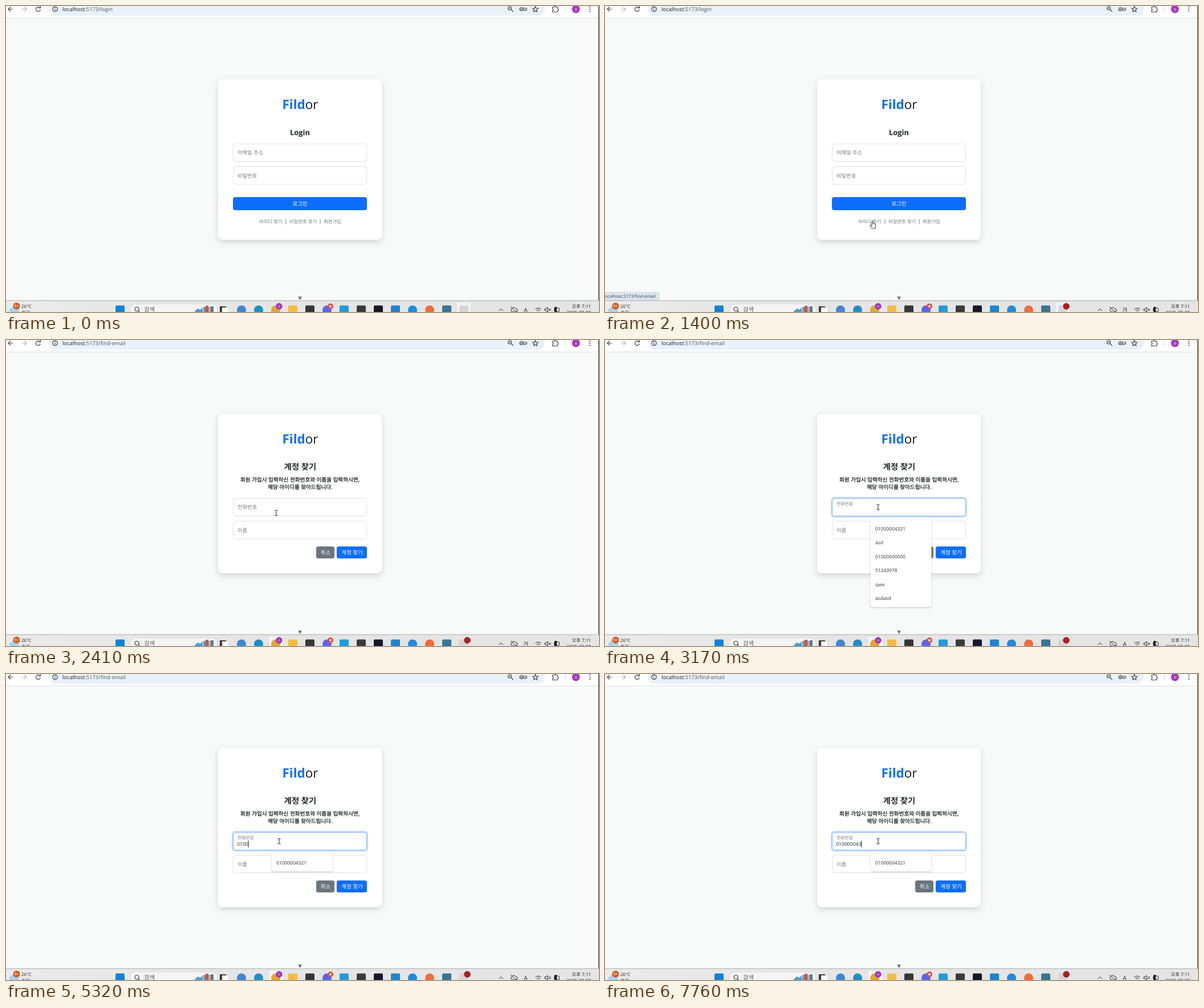
These frames come from a looping animation (1040 by 538 pixels, 8 s). An HTML page:

```html
<!DOCTYPE html>
<html lang="ko">
<head>
<meta charset="utf-8">
<title>Login</title>
<style>
html, body { margin: 0; width: 100%; height: 100%; overflow: hidden; background: #f8faf9; }
svg { display: block; width: 100%; height: 100%; font-family: 'Open Sans', 'Noto Sans CJK KR', sans-serif; text-rendering: geometricPrecision; }
text { white-space: pre; }
.mid { text-anchor: middle; }
.line { fill: none; stroke: #444; stroke-width: 1.2; }
.card { fill: #fff; filter: drop-shadow(0 4px 5.5px rgba(0,0,0,.15)); }
.field { fill: #fff; stroke: #dee2e6; }
.label { font-size: 9.3px; fill: #777; }
.btn { font-size: 9.5px; fill: #fff; text-anchor: middle; }
.link { font-size: 8.4px; fill: #6c757d; }
.brand { font-size: 22.5px; text-anchor: middle; fill: #16191c; }
.brand tspan { font-weight: 700; fill: #0d6efd; }
.head { font-weight: 700; text-anchor: middle; fill: #212529; }
.note { font-size: 9.6px; text-anchor: middle; fill: #212529; stroke: #212529; stroke-width: .3; }
.pop { fill: #fff; filter: drop-shadow(0 1px 1px rgba(0,0,0,.24)); }
.item { font-size: 8.45px; fill: #333; }
</style>
</head>
<body>
<svg viewBox="0 0 1040 538">
  <defs><linearGradient id="bar"><stop stop-color="#ebebeb"/><stop offset=".35" stop-color="#e5e5e5"/></linearGradient></defs>
  <rect width="1040" height="538" fill="#f8faf9"/>

  <!-- browser bar -->
  <rect width="1040" height="21" fill="#fff"/>
  <rect y="20.5" width="1040" height="1" fill="#dcdfe3"/>
  <rect x="75" y="-8" width="870" height="25" rx="12" fill="#e9f1fb"/>
  <path class="line" d="M12 5.5H4M8 1.5l-4 4 4 4"/>
  <path class="line" d="M28 5.5h8M32 1.5l4 4-4 4" style="stroke:#b5b5b5"/>
  <path class="line" d="M59.5 3a4 4 0 1 0 .8 3.5M60.5 0v3.5H57"/>
  <circle class="line" cx="86" cy="5.5" r="4.2"/>
  <path class="line" d="M86 5v3M86 2.8v1.2"/>
  <text x="99" y="9" font-size="9.4" fill="#1f1f1f">localhost<tspan fill="#555">:5173/<tspan id="route"></tspan></tspan></text>
  <g class="line">
    <circle cx="883.5" cy="4" r="3"/><path d="M886 6.5l3.5 3.5M882 4h3"/>
    <circle cx="904" cy="5.5" r="3"/><circle cx="904" cy="5.5" r=".6"/><path d="M907 4h6v3h-6M910 7v2"/>
    <path d="M928.5 .8l1.4 3.2 3.5.3-2.7 2.3.8 3.4-3-1.8-3 1.8.8-3.4-2.7-2.3 3.5-.3z"/>
    <path d="M958.5 2h3a1.5 1.5 0 0 1 3 0h3v3a1.5 1.5 0 0 1 0 3v2.5h-9V8a1.5 1.5 0 0 0 0-3z"/>
  </g>
  <rect x="980.5" width="1" height="11" fill="#c9d6e6"/>
  <circle cx="999.5" cy="5.5" r="7" fill="#a93abb"/>
  <text class="mid" x="999.5" y="8" font-size="7" fill="#fff">o</text>
  <g fill="#444"><circle cx="1024" cy="1.5" r="1.1"/><circle cx="1024" cy="5.5" r="1.1"/><circle cx="1024" cy="9.5" r="1.1"/></g>

  <!-- login page -->
  <g id="login">
    <rect class="card" x="372" y="129" width="287" height="282" rx="8"/>
    <text class="brand" x="516" y="181"><tspan>Fild</tspan>or</text>
    <text class="head" x="515.5" y="227" font-size="13">Login</text>
    <rect class="field" x="398.5" y="242.5" width="234" height="31" rx="4"/>
    <text class="label" x="406" y="261">이메일 주소</text>
    <rect class="field" x="398.5" y="282.5" width="234" height="31" rx="4"/>
    <text class="label" x="406" y="301.5">비밀번호</text>
    <rect x="398" y="336" width="235" height="23" rx="4" fill="#0d6efd"/>
    <text class="btn" x="515.5" y="350.8">로그인</text>
    <text class="link" x="444" y="381.5">아이디 찾기</text>
    <text class="link" x="497" y="381.5">비밀번호 찾기</text>
    <text class="link" x="557" y="381.5">회원가입</text>
    <path d="M491 374.5v9M551 374.5v9" stroke="#6c757d" stroke-width=".9"/>
  </g>

  <!-- account search page -->
  <g id="find">
    <rect class="card" x="372" y="130" width="287" height="280" rx="8"/>
    <text class="brand" x="516" y="182"><tspan>Fild</tspan>or</text>
    <text class="head" x="516" y="228" font-size="14.3">계정 찾기</text>
    <text class="note" x="515.5" y="249">회원 가입시 입력하신 전화번호와 이름을 입력하시면,</text>
    <text class="note" x="516" y="262">해당 아이디를 찾아드립니다.</text>
    <rect id="ring" x="397.2" y="277.2" width="236.6" height="33.6" rx="5" fill="none" stroke="#c2dbfe" stroke-width="2.5"/>
    <rect id="phone" class="field" x="398.5" y="278.5" width="234" height="31" rx="4"/>
    <text id="hint" class="label" x="406">전화번호</text>
    <text id="typed" x="405.2" y="302" font-size="8.6" fill="#212529"></text>
    <rect id="caret" y="293" width="1" height="12" fill="#212529"/>
    <rect class="field" x="398.5" y="318.5" width="234" height="31" rx="4"/>
    <text class="label" x="406" y="337.5">이름</text>
    <rect x="544" y="363" width="32" height="21" rx="3.5" fill="#6c757d"/>
    <text class="btn" x="560.5" y="377">취소</text>
    <rect x="580" y="363" width="53" height="21" rx="3.5" fill="#0d6efd"/>
    <text class="btn" x="607" y="377">계정 찾기</text>
  </g>
  <g id="list"><path id="panel" class="pop"/></g>

  <circle cx="516" cy="513" r="8.5" fill="#fff" opacity=".7"/>
  <path d="M512 510l3.5 1.5 3.5-1.5-3.5 7z" fill="#666"/>
  <g id="status">
    <path d="M0 503h92q3 0 3 3v12H0z" fill="#dbe4ed" stroke="#cdd5dc" stroke-width=".6"/>
    <text x="-2" y="513.3" font-size="7.7" fill="#3c4a57">localhost:5173/find-email</text>
  </g>
  <rect x="1039" width="1" height="518" fill="#222"/>

  <!-- taskbar -->
  <rect y="518" width="1040" height="20" fill="url(#bar)"/>
  <rect y="517.5" width="1040" height="1" fill="#aaa"/>
  <path d="M7 538a4 4 0 0 1 2-7 6 6 0 0 1 11 0 4 4 0 0 1 2 7z" fill="#a9d2f3"/>
  <circle cx="18.5" cy="527.5" r="6" fill="#d35a1c"/>
  <text class="mid" x="18.5" y="530.3" font-size="7.5" fill="#fff">9+</text>
  <text x="27" y="531" font-size="8" fill="#222">26°C</text>
  <text x="27" y="541.5" font-size="8.4" fill="#555">흐림</text>
  <rect x="218" y="524" width="152" height="26" rx="9" fill="#f5f5f5" stroke="#d6d6d6" stroke-width=".7"/>
  <circle class="line" cx="229.5" cy="533" r="3.5"/><path class="line" d="M232 535.5l3 3"/>
  <text x="242" y="537" font-size="10.3" fill="#555">검색</text>
  <path d="M330 538l6-6 5 2 4-4v8z" fill="#4b9bd0"/>
  <rect x="346" y="529" width="4" height="9" fill="#7a8fae"/><rect x="350" y="527" width="5" height="11" fill="#b65c52"/>
  <rect x="355" y="529" width="4" height="9" fill="#d9a08d"/><rect x="359" y="528" width="5" height="10" fill="#4c7ea6"/>
  <rect id="tile" y="521" width="26" height="22" rx="3" fill="#f4f4f4" stroke="#d3d3d3" stroke-width=".6"/>
  <g id="apps"><rect x="375" y="528" width="11" height="11" fill="#333"/><rect x="379" y="530" width="12" height="10" fill="#fff" stroke="#bbb" stroke-width=".6"/></g>
  <circle cx="479" cy="528" r="5.7" fill="#9d37b5"/>
  <text class="mid" x="479" y="530.3" font-size="6.5" fill="#fff">o</text>
  <circle cx="569" cy="528" r="5" fill="#e04f43"/><circle cx="569" cy="528" r="2" fill="#fff"/>
  <circle id="rec" cx="809" cy="528" r="5.8" fill="#aa1f22"/>
  <g class="line" style="stroke:#222;stroke-width:1">
    <path d="M864.5 536l3.7-3.7 3.7 3.7"/>
    <path d="M887 537a3 3 0 0 1 0-5 4 4 0 0 1 7 0 3 3 0 0 1 0 6h-5zM885 529l10 9"/>
    <path d="M928.5 533a7.5 7.5 0 0 1 10 0M930.5 535.5a4.5 4.5 0 0 1 6 0M933 537.5h1"/>
    <path d="M945 532.5h2l3-2.5v8l-3-2.5h-2zM952 532l3.5 4M955.5 532l-3.5 4"/>
    <rect x="961.5" y="531" width="9" height="6" rx="1.5"/>
  </g>
  <path d="M962 529h4v9h-4z" fill="#222"/>
  <text id="ime" class="mid" x="911.5" y="537.5" font-size="10" fill="#222"></text>
  <g text-anchor="end" fill="#222" font-size="8.2"><text x="1026" y="531">오후 7:11</text><text x="1026" y="541.5">2025-08-08</text></g>

  <!-- pointers -->
  <g id="pointer" stroke-linejoin="round">
    <path id="arrow" d="M0 0v11.5l2.7-2.5 1.8 4 1.8-.8-1.8-3.9h3.7z" fill="#fff" stroke="#222" stroke-width=".9"/>
    <path id="hand" d="M-1 1q1-1.7 2 0v4l4 .9q1.2.4 1 2l-.8 3.6V13.5H-1L-4 9q-.7-1.5.7-1.5L-1 9z" fill="#fff" stroke="#222" stroke-width=".9"/>
    <path id="beam" d="M-2.5-4.500h2L0-4 .5-4.500h2M-2.500 4.500h2L0 4 .5 4.500h2M0-4v8" fill="none" stroke="#222"/>
  </g>
</svg>
<script>
const $ = id => document.getElementById(id);
const show = (id, on) => $(id).style.display = on ? '' : 'none';
const set = (id, attrs) => { for (const k in attrs) $(id).setAttribute(k, attrs[k]); };
const add = (parent, tag, attrs) => {
  const el = document.createElementNS('http://www.w3.org/2000/svg', tag);
  for (const k in attrs) el.setAttribute(k, attrs[k]);
  return $(parent).appendChild(el);
};

const NUMBER = '01000004321';
const PAST = [NUMBER, 'asd', '01000000000', '51243978', 'qwe', 'asdasd'];
const items = PAST.map((_, i) => add('list', 'text', { class: 'item', x: 474, y: 334.7 + i * 24.55 }));

const square = (x, fill) => add('apps', 'rect', { x: x - 8, y: 526.5, width: 16, height: 16, rx: 2, fill });
const round = (x, fill) => add('apps', 'circle', { cx: x, cy: 534.5, r: 8, fill });
square(200, '#0f83d8');
round(413, '#3f86d6');
round(443, '#1d8fc4');
round(473, '#e2a52f');
square(503, '#f5bd3f');
square(533, '#363636');
round(563, '#5865f2');
square(593, '#219bdc');
square(623, '#3a3a3a');
square(653, '#17172b');
square(683, '#1f83cf');
round(713, '#1f8ae0');
round(743, '#f26b3a');
square(773, '#3a7391');
square(803, '#d6d6d6');

// Value of the last entry whose time has come
const at = (steps, t) => steps.reduce((v, [time, value]) => t >= time ? value : v, steps[0][1]);
const typed = n => NUMBER.slice(0, n);
const TEXT = [[0, ''], [3310, typed(1)], [3380, typed(2)], [3450, typed(3)], [3720, typed(4)],
  [3860, typed(4) + '8'], [4130, typed(4) + '87'], [4660, typed(4) + '877'], [4790, typed(4) + '87'],
  [5320, typed(4)], [6180, typed(5)], [7110, typed(6)], [7440, typed(7)], [7630, typed(8)], [7760, typed(9)]];
const ROWS = [[0, 0], [2740, 6], [3310, 2], [3720, 1], [3930, 0], [5320, 1]];
const CARET = [[0, 0], [2670, 1], [3170, 0], [3310, 1], [5850, 0], [6180, 1], [6710, 0], [7110, 1]];
const PATH = [[70, 803, 529], [870, 461, 394], [1330, 469, 377.5], [2070, 469, 377.5], [2410, 474, 304], [2600, 479, 294]];

function pointerAt(t) {
  const i = PATH.findIndex(p => p[0] > t);
  if (i < 0) return PATH[PATH.length - 1].slice(1);
  if (!i) return PATH[0].slice(1);
  const [t0, x0, y0] = PATH[i - 1], [t1, x1, y1] = PATH[i];
  const u = (t - t0) / (t1 - t0), e = u * u * (3 - 2 * u);
  return [x0 + (x1 - x0) * e, y0 + (y1 - y0) * e];
}

function drawList(rows) {
  show('list', rows);
  if (!rows) return;
  const bottom = 347 + (rows - 1) * 24.55;
  set('panel', { d: `M469.5 316h5.5l4.500-5 4.500 5h84.500q4 0 4 4V${bottom - 4}q0 4-4 4h-99q-4 0-4-4V320q0-4 4-4z` });
  const shown = rows === 2 ? PAST.filter(s => s.startsWith('01')) : PAST.slice(0, rows);
  items.forEach((el, i) => el.textContent = shown[i] || '');
}

function draw(t) {
  const found = t >= 1800, focus = t >= 2670;
  $('route').textContent = t < 1730 ? 'login' : 'find-email';
  show('login', !found);
  show('find', found);

  show('ring', focus);
  set('phone', { style: focus ? 'stroke:#86b7fe' : '' });
  set('hint', { y: focus ? 290.5 : 297, style: focus ? 'font-size:7.9px' : '' });
  $('typed').textContent = at(TEXT, t);
  show('caret', at(CARET, t));
  if (found) set('caret', { x: 405 + $('typed').getComputedTextLength() });
  drawList(at(ROWS, t));

  show('status', t >= 1070 && t < 2130);
  $('status').style.opacity = Math.min(1, (t - 1000) / 270);
  set('tile', { x: t < 1730 ? 790 : 461 });
  show('rec', t >= 140);
  $('ime').textContent = t < 270 || focus ? 'A' : '가';

  const [x, y] = pointerAt(t);
  const inField = found && (y < 310 || y > 318 && y < 350);
  const kind = inField ? 'beam' : t >= 1070 && !found ? 'hand' : 'arrow';
  show('pointer', t >= 70);
  set('pointer', { transform: `translate(${x} ${y})` });
  for (const k of ['arrow', 'hand', 'beam']) show(k, k === kind);
}

const start = performance.now();
function tick() {
  draw((performance.now() - start) % 8000);
  requestAnimationFrame(tick);
}
tick();
</script>
</body>
</html>
```
